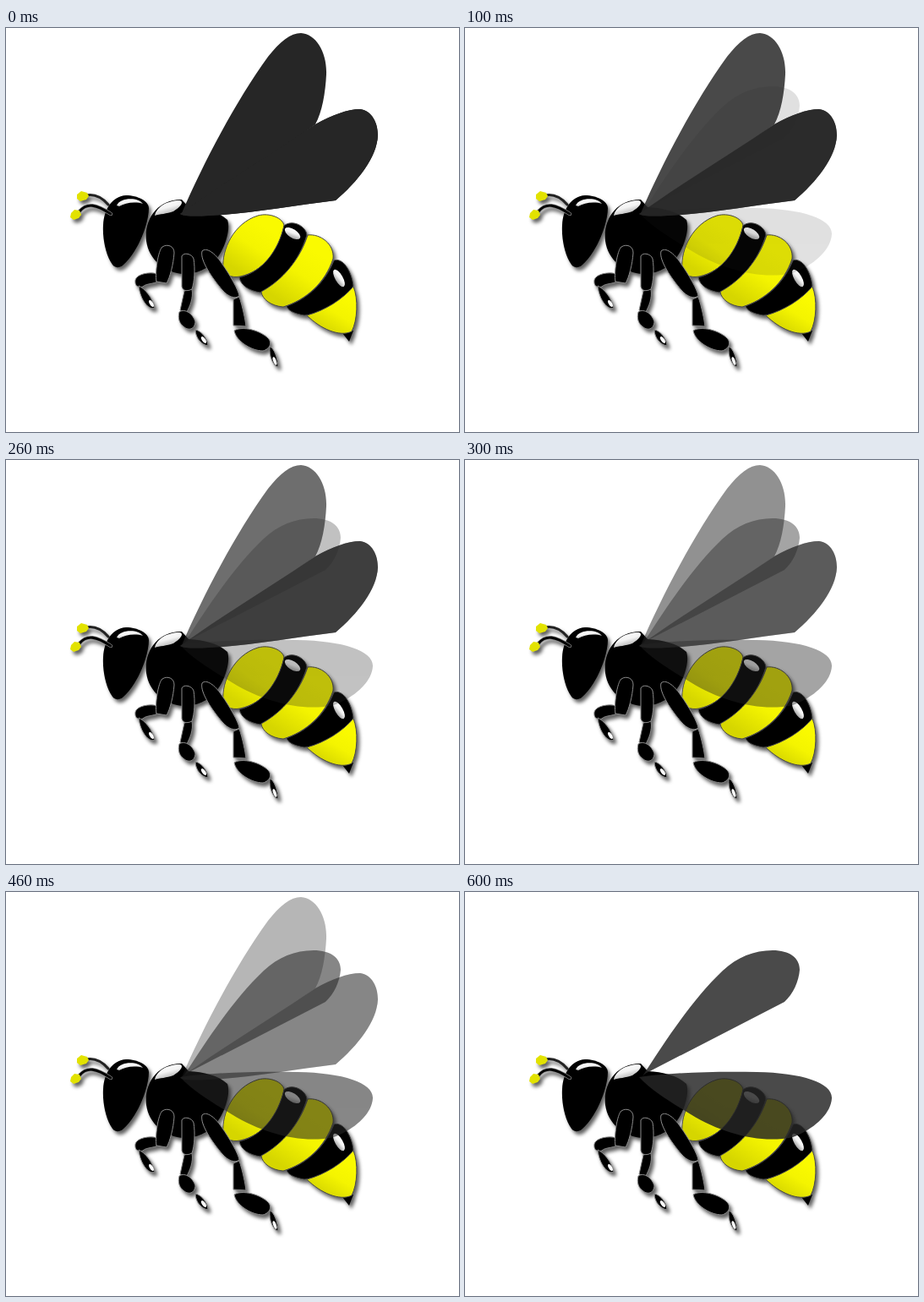
Animation of 536x478 px, one loop 0.7 s. Source, as an HTML page:

```html
<!DOCTYPE html>
<html lang="en">
<head>
<meta charset="utf-8">
<title>Bee</title>
<style>
  html, body { margin: 0; width: 100%; height: 100%; overflow: hidden; background: #fff; }
  svg { display: block; width: 536px; height: 478px; }
  #body { filter: drop-shadow(3px 4px 2.2px rgba(0, 0, 0, .62)); }
  .limb { stroke: #8c8c8c; stroke-width: 1; }
  .band { stroke: #4a4a4a; stroke-width: 1; }
  .wing { fill: #262626; }
</style>
</head>
<body>
<svg viewBox="0 0 536 478">
  <defs>
    <linearGradient id="yellow" x1=".7" y1=".2" x2=".25" y2=".9">
      <stop offset="0" stop-color="#fafa00"/>
      <stop offset=".45" stop-color="#f4f400"/>
      <stop offset="1" stop-color="#d6d600"/>
    </linearGradient>
    <linearGradient id="shine" x2=".5" y2="1">
      <stop offset="0" stop-color="#fff"/>
      <stop offset=".55" stop-color="#f4f4f4"/>
      <stop offset="1" stop-color="#aaa"/>
    </linearGradient>
    <path id="upBack" d="M208 219 C232 163 272 86 310 34 C324 16 337 6 349 6 C367 7 380 29 379 55 C378 76 374 100 366 114 C318 149 264 181 208 219Z"/>
    <path id="upFront" d="M206 220 C254 185 313 150 366 114 C386 103 404 96 419 96 C433 98 440 112 440 127 C439 153 416 182 390 204 C340 210 286 220 240 222 C224 223 211 223 206 220Z"/>
    <path id="downBack" d="M210 218 C236 178 268 128 305 93 C322 77 342 69 364 69 C384 69 396 78 396 92 C395 106 388 121 378 130 L213 215Z"/>
    <path id="downFront" d="M206 219 C240 214 290 212 345 213 C400 214 435 226 434 244 C433 262 414 280 388 290 C352 298 306 287 267 263 C244 249 222 236 206 219Z"/>
  </defs>

  <g id="body">
    <!-- head and antennae -->
    <path d="M95 198 C106 196 114 201 121 209" fill="none" stroke="#222" stroke-width="3" stroke-linecap="round"/>
    <path d="M142 198 C156 198 169 205 169 213 C169 233 155 267 138 281 C134 284 129 284 126 280 C118 269 114 249 115 233 C116 214 126 199 142 198Z"/>
    <path fill="url(#shine)" d="M131 210 C135 200 157 200 162 208 C152 205 141 207 134 211Z"/>
    <g fill="none" stroke-linecap="round">
      <path d="M87 217 C96 206 107 209 124 220" stroke="#888" stroke-width="4.4"/>
      <path d="M87 217 C96 206 107 209 124 220" stroke="#000" stroke-width="2.8"/>
    </g>
    <path fill="#e2e200" d="M84 197 L89 193 L96 195 L98 199 L95 203 L88 205 L84 202Z"/>
    <path fill="#e2e200" d="M77 219 L81 215 L87 216 L89 221 L86 225 L80 227 L76 224Z"/>

    <!-- thorax -->
    <path d="M208 203 L216 212 C235 213 251 217 262 227 C266 239 259 260 250 272 C239 286 224 291 211 291 C188 290 169 274 166 252 C163 225 181 202 208 203Z"/>
    <path fill="url(#shine)" d="M176 222 C178 212 190 204 206 204 C211 206 206 212 198 217 C190 220 182 220 176 222Z"/>

    <!-- abdomen -->
    <path d="M398 361 L411 358 L406 371Z"/>
    <g class="band">
      <path fill="url(#yellow)" d="M257 284 C255 263 269 231 298 222 C312 218 328 225 329 234 C323 263 305 288 277 294 C266 296 259 292 257 284Z"/>
      <path d="M329 234 C338 226 355 234 356 245 C347 275 327 301 301 313 C288 311 278 305 276 295 C303 289 322 264 329 234Z"/>
      <path fill="url(#yellow)" d="M357 245 C372 243 389 256 387 273 C378 301 355 322 328 330 C314 329 303 321 302 312 C328 298 348 273 357 245Z"/>
      <path d="M388 275 C398 271 409 287 411 305 C400 325 378 338 353 340 C341 338 333 334 332 329 C358 320 378 300 388 275Z"/>
      <path fill="url(#yellow)" d="M411 306 C417 320 416 346 409 359 C395 366 372 356 356 340 C378 334 398 321 411 306Z"/>
    </g>
    <ellipse cx="339" cy="243" rx="10.5" ry="5" transform="rotate(33 339 243)" fill="url(#shine)"/>
    <ellipse cx="394" cy="296" rx="11.5" ry="4.5" transform="rotate(60 394 296)" fill="url(#shine)"/>

    <!-- legs -->
    <g class="limb">
      <path d="M153 298 C155 291 170 288 179 291 L178 301 C170 303 165 303 162 306 C156 308 152 305 153 298Z"/>
      <path d="M178 300 C176 290 180 263 185 259 C191 255 199 258 199 266 C198 280 194 295 190 302Z"/>
      <path d="M157 305 C164 308 174 320 176 331 C171 335 159 324 157 305Z"/>
      <path d="M211 311 L220 309 C222 320 217 330 214 336 L206 334Z"/>
      <path d="M208 270 C210 265 220 267 222 273 C224 285 223 300 220 309 C214 312 209 311 208 306Z"/>
      <path d="M205 336 C212 331 222 339 224 348 C223 357 216 358 211 354 C205 350 203 343 205 336Z"/>
      <path d="M224 357 C231 358 239 368 239 376 C232 375 224 367 224 357Z"/>
      <path d="M269 321 L276 318 C280 330 283 345 284 353 L269 352Z"/>
      <path d="M232 264 C237 259 247 266 255 278 C265 292 275 310 276 317 C271 321 263 318 256 310 C245 297 229 275 232 264Z"/>
      <path d="M270 358 C280 352 300 358 309 366 C316 372 312 380 304 382 C290 382 272 370 270 358Z"/>
      <path d="M312 377 C317 378 322 392 322 401 C316 400 311 388 312 377Z"/>
    </g>
    <g fill="#fff">
      <ellipse cx="172" cy="326" rx="4.5" ry="2" transform="rotate(60 172 326)"/>
      <ellipse cx="234" cy="369" rx="4.5" ry="2" transform="rotate(55 234 369)"/>
      <ellipse cx="318" cy="394" rx="5" ry="1.8" transform="rotate(70 318 394)"/>
    </g>
  </g>

  <!-- raised wings: the front one is doubled, so it fades more slowly -->
  <g id="down" class="wing">
    <use href="#downBack"/>
    <use href="#downFront"/>
  </g>
  <g id="up" class="wing">
    <use href="#upBack"/>
    <use href="#upFront"/>
  </g>
  <g id="upAgain" class="wing"><use href="#upFront"/></g>
</svg>
<script>
  const STEP = 100, STEPS = 7, DOWN_OPACITY = 0.83;
  const [up, upAgain, down] = ['up', 'upAgain', 'down'].map(id => document.getElementById(id));
  const start = performance.now();

  function draw(time) {
    const step = Math.floor(time / STEP) % STEPS;
    const lowered = step / (STEPS - 1);
    up.style.opacity = upAgain.style.opacity = 1 - lowered;
    down.style.opacity = DOWN_OPACITY * lowered;
  }

  function tick(now) {
    draw(Math.max(0, now - start));
    requestAnimationFrame(tick);
  }
  draw(0);
  requestAnimationFrame(tick);
</script>
</body>
</html>
```
